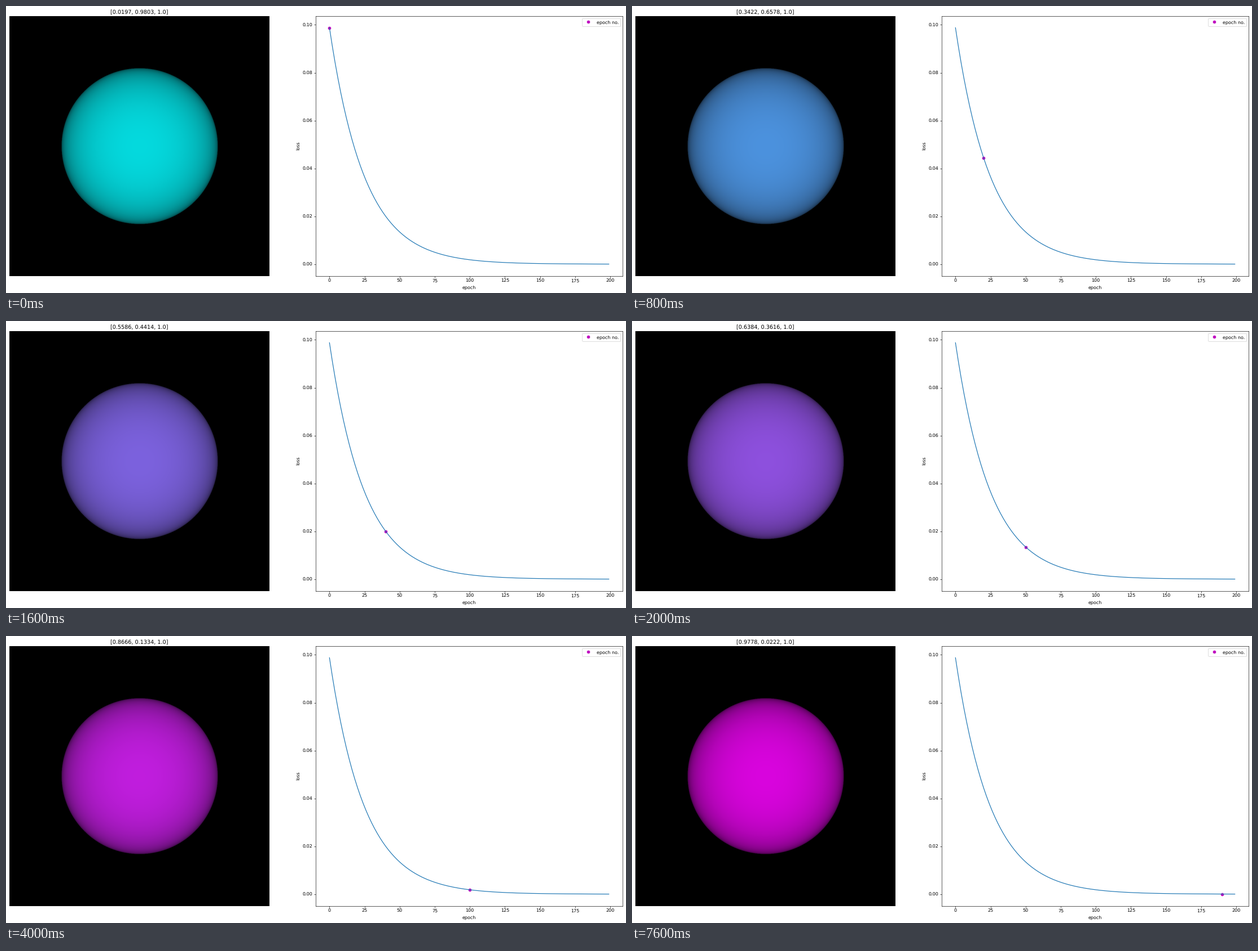
Write a matplotlib script that moves like this. It is 1099 px wide and 510 px high and loops after 8000 ms.

```python
import math

import numpy as np
import matplotlib.pyplot as plt
from matplotlib.animation import FuncAnimation

WIDTH, HEIGHT, DPI = 1099, 510, 57.6
FRAMES, INTERVAL = 20, 400
EPOCH_STEP = 10
DECAY = 0.019944  # shrink rate of the colour error per epoch
LOSS_START = 0.0988
VIEW = (6, 18, 467, 480)  # left, top, right, bottom in pixels
EDGE = 0.05  # keeps the image from spilling into the next pixel

plt.rcParams["font.family"] = "DejaVu Sans"
plt.rcParams["text.hinting"] = "none"


def loss(epoch):
    return LOSS_START * np.exp(-2 * DECAY * epoch)


def sphere_color(epoch):
    error = math.exp(-DECAY * (epoch + 1))
    return [round(1 - error, 4), round(error, 4), 1.0]


def sphere_shade(cx=237.0, cy=249.0, radius=138.6, peak=0.87):
    """Gamma-corrected diffuse shading of a sphere lit from the camera."""
    left, top, right, bottom = VIEW
    x, y = np.meshgrid(np.arange(left, right, 0.5) + 0.25,
                       np.arange(top, bottom, 0.5) + 0.25)
    cos2 = np.clip(1 - ((x - cx) ** 2 + (y - cy) ** 2) / radius**2, 0, 1)
    return peak * cos2 ** (0.5 / 2.2)


def add_axes(left, top, right, bottom):
    return fig.add_axes([left / WIDTH, 1 - bottom / HEIGHT,
                         (right - left) / WIDTH, (bottom - top) / HEIGHT])


fig = plt.figure(figsize=((WIDTH + 1e-4) / DPI, (HEIGHT + 1e-4) / DPI),
                 dpi=DPI, facecolor="white")

shade = sphere_shade()[..., None]
left, top, right, bottom = VIEW
view = add_axes(left + EDGE, top + EDGE, right - EDGE, bottom - EDGE)
view.axis("off")
image = view.imshow(shade * sphere_color(0), aspect="auto")
title = view.set_title("")

chart = add_axes(548.6, 17.6, 1093.4, 479.6)
epochs = np.arange(200)
marker, = chart.plot([0], [loss(0)], "mo", label="epoch no.")
chart.plot(epochs, loss(epochs), color="C0")
chart.set_xlabel("epoch")
chart.set_ylabel("loss")
chart.legend(loc="upper right")


def update(frame):
    epoch = frame * EPOCH_STEP
    color = sphere_color(epoch)
    image.set_data(shade * color)
    title.set_text(str(color))
    marker.set_data([epoch], [loss(epoch)])
    return image, title, marker


anim = FuncAnimation(fig, update, frames=FRAMES, interval=INTERVAL,
                     repeat=True, repeat_delay=0, blit=False)
plt.show()
```
